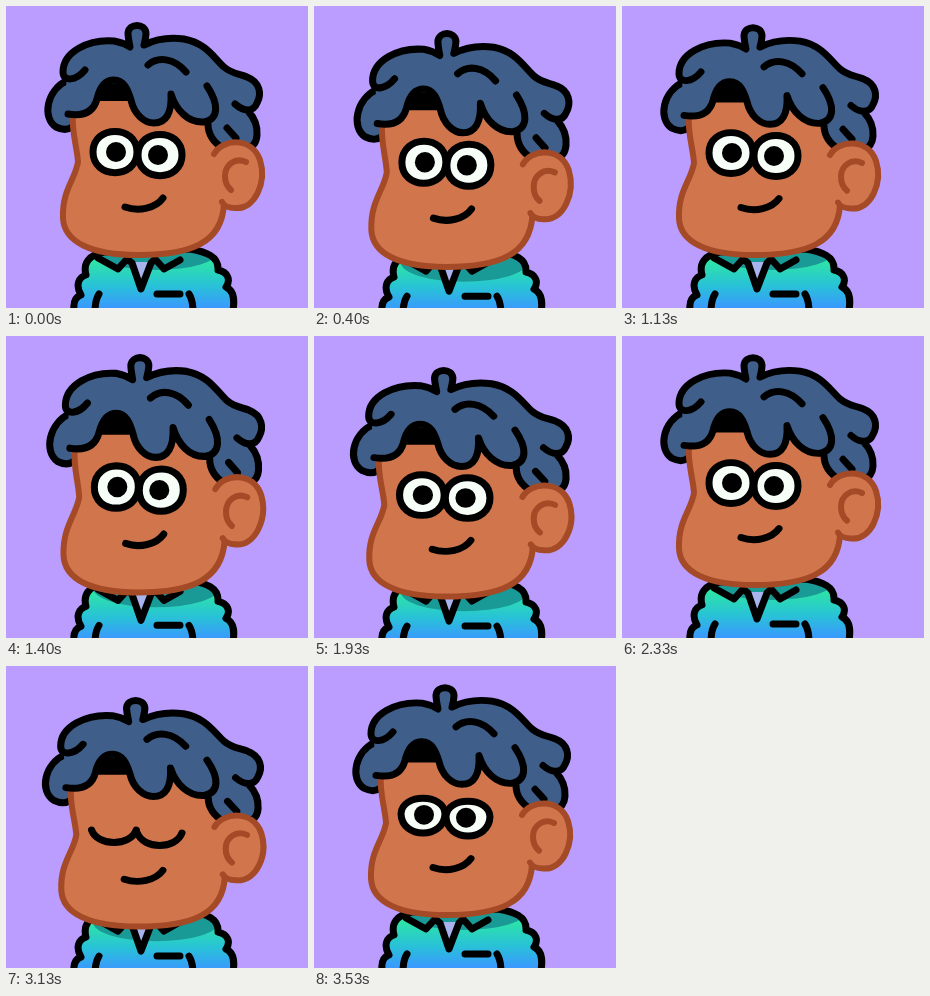
Write an HTML page that moves like this. It is 302 by 302 pixels and loops after 3590 ms.

```html
<!DOCTYPE html>
<html lang="en">
<head>
<meta charset="utf-8">
<title>Bobbing head</title>
<style>
  html, body { margin: 0; width: 100%; height: 100%; overflow: hidden; background: #bb9dff; }
  svg { display: block; width: 100vw; height: 100vh; }
  .line { fill: none; stroke: #000; stroke-width: 7; stroke-linecap: round; stroke-linejoin: round; }
  .edge { fill: none; stroke: #a44a26; stroke-width: 6; stroke-linecap: round; stroke-linejoin: round; }
  .skin { fill: #d1764c; }
  .hair { fill: #3f5f8a; }
  .white { fill: #f7fdf7; }
</style>
</head>
<body>
<svg viewBox="0 0 302 302">
  <defs>
    <linearGradient id="cloth" gradientUnits="userSpaceOnUse" x1="0" y1="256" x2="0" y2="302">
      <stop offset="0" stop-color="#2de3a8"/>
      <stop offset=".5" stop-color="#28c3d6"/>
      <stop offset="1" stop-color="#3a98ff"/>
    </linearGradient>
    <path id="torso" d="M69 310C66 297 69 291 75 289C69 279 73 271 80 269C77 258 82 249 98 246L184 243C200 246 213 250 212 264C222 266 225 274 220 281C229 285 229 296 226 310"/>
    <clipPath id="torsoClip"><use href="#torso"/></clipPath>
    <clipPath id="leftClip"><path class="leftLid"/></clipPath>
    <clipPath id="rightClip"><path class="rightLid"/></clipPath>
  </defs>

  <rect width="302" height="302" fill="#bb9dff"/>

  <g id="shirt">
    <use href="#torso" fill="url(#cloth)"/>
    <g clip-path="url(#torsoClip)">
      <ellipse id="shade" cx="150" cy="245" rx="63" ry="19" fill="#1a9a96"/>
    </g>
    <path d="M126 256L135 283L145 256Z" fill="#a9b4ee"/>
    <use href="#torso" class="line"/>
    <path class="line" d="M92 252L112 263L121 253L126 257L135 283L145 257L149 253L158 263L174 254M151 288H174M93 288Q89 294 89 306M183 288Q187 294 187 306"/>
  </g>

  <g id="head">
    <path class="hair" d="M62 74C40 84 36 112 50 121C56 124 62 124 66 121L90 100Z"/>
    <path class="line" d="M62 74C40 84 36 112 50 121C56 124 62 124 66 121"/>

    <path class="skin" d="M67 106C65 125 71 140 72 156C69 174 56 184 57 212C58 236 85 249 132 249C185 249 216 237 218 196L215 140L205 90L67 90Z"/>
    <path class="edge" d="M67 106C65 125 71 140 72 156C69 174 56 184 57 212C58 236 85 249 132 249C185 249 216 237 218 198"/>

    <path fill="#000" d="M90 95L94 72H122L127 95Z"/>
    <path class="hair" d="M202 118C202 128 208 137 218 143H242C252 142 256 120 242 105L210 80Z"/>
    <path id="fringe" class="hair"/>
    <path id="crown" class="hair"/>
    <path id="hairLine" class="line"/>

    <g transform="translate(0 1)">
      <path class="skin" d="M208 147C217 131 246 130 254 153C261 175 249 203 229 201C223 201 218 199 216 195L206 180Z"/>
      <path class="edge" d="M208 147C217 131 246 130 254 153C261 175 249 203 229 201C223 201 218 199 216 195M240 155C229 150 219 158 219 169Q219 178 225 183"/>
    </g>

    <path class="white leftLid"/>
    <path class="white rightLid"/>
    <g clip-path="url(#leftClip)"><circle class="pupil" cx="110" cy="146" r="10"/></g>
    <g clip-path="url(#rightClip)"><circle class="pupil" cx="152" cy="149" r="10"/></g>
    <path class="line leftLid"/>
    <path class="line rightLid"/>
    <path class="line" d="M119 201C133 206 150 202 157 192"/>
  </g>
</svg>

<script>
const LOOP = 3590, BOB = 1200;
const TOP = 16, CHIN = 250;

// Start within one bob, crown drop, chin drop, width factor, crown lean
const poses = [
  [0, 0, 0, 1, 0],
  [200, 2, 7.5, 1, 3],
  [400, 8, 12, 1, 2],
  [530, 12.5, 13, 1.008, 0],
  [730, 15, 11.5, 1.016, -1],
  [930, 10, 4, 1.024, -1],
  [1000, 7, 2, 1.018, -1],
  [1060, 4.5, 1, 1.008, 0],
  [1130, 2.3, 0, 1, 0]
];
const blinks = [[0, 0], [3130, 1], [3330, .6], [3400, .4], [3530, .15]];

const $ = id => document.getElementById(id);
const all = selector => document.querySelectorAll(selector);
const lerp = (a, b, k) => a + (b - a) * k;
const current = (steps, t) => steps.findLast(step => step[0] <= t);
const setPath = (selector, d) => all(selector).forEach(el => el.setAttribute('d', d));

function buildHair() {
  const fringe = 'M62 108C80 111 88 104 91 93C94 80 100 74 108 74C118 74 122 84 125 94C128 108 138 117 148 117C160 117 166 107 165 88C170 104 182 117 198 116';
  const crown = 'M79 64C70 75 57 76 57 66C57 46 82 33 108 35C114 36 119 38 124 41C123 36 122 31 122 27C123 17 139 17 140 27C140 31 139 35 138 39C150 33 164 31 178 33C200 37 208 52 218 61C226 68 234 68 241 71C254 76 256 88 251 97C247 107 237 105 229 98';
  setPath('#fringe', fringe + 'L218 108L214 62H70L60 72Z');
  setPath('#crown', crown + 'L202 80L62 76L57 66Z');
  setPath('#hairLine', fringe + 'C213 113 213 98 201 80' + crown +
    'M242 105C256 120 252 142 242 141M221 122L230 132' +
    'M202 118C202 128 208 137 218 143M142 59C152 50 168 52 180 66');
}

function eyePath(cx, cy, closed) {
  const y = cy + 5 * closed;
  const upper = y + lerp(-27.5, 17, closed);
  const lower = y + lerp(27.5, 17, closed);
  const [left, right] = [cx - 22, cx + 22];
  const inset = 6 * closed;
  const [a, b] = [left + inset, right - inset];
  return `M${left} ${y}C${a} ${lower} ${b} ${lower} ${right} ${y}C${b} ${upper} ${a} ${upper} ${left} ${y}Z`;
}

function draw(time) {
  const t = time % LOOP;
  const [, crown, chin, sx, lean] = current(poses, t % BOB);
  const closed = current(blinks, t)[1];

  const height = CHIN - TOP;
  const sy = 1 + (chin - crown) / height;
  const skew = -lean / height;
  const tx = 152 * (1 - sx) - skew * CHIN;
  const ty = TOP + crown - TOP * sy;
  $('head').setAttribute('transform', `matrix(${sx} 0 ${skew} ${sy} ${tx} ${ty})`);
  $('shirt').setAttribute('transform', `translate(0 ${chin * .18})`);
  $('shade').setAttribute('transform', `translate(0 ${chin * .8})`);

  setPath('.leftLid', eyePath(109, 146, closed));
  setPath('.rightLid', eyePath(154, 149, closed));
  all('.pupil').forEach(el => el.setAttribute('transform', `translate(0 ${12 * closed})`));
}

buildHair();
const start = performance.now();
(function tick() {
  draw(performance.now() - start);
  requestAnimationFrame(tick);
})();
</script>
</body>
</html>
```
